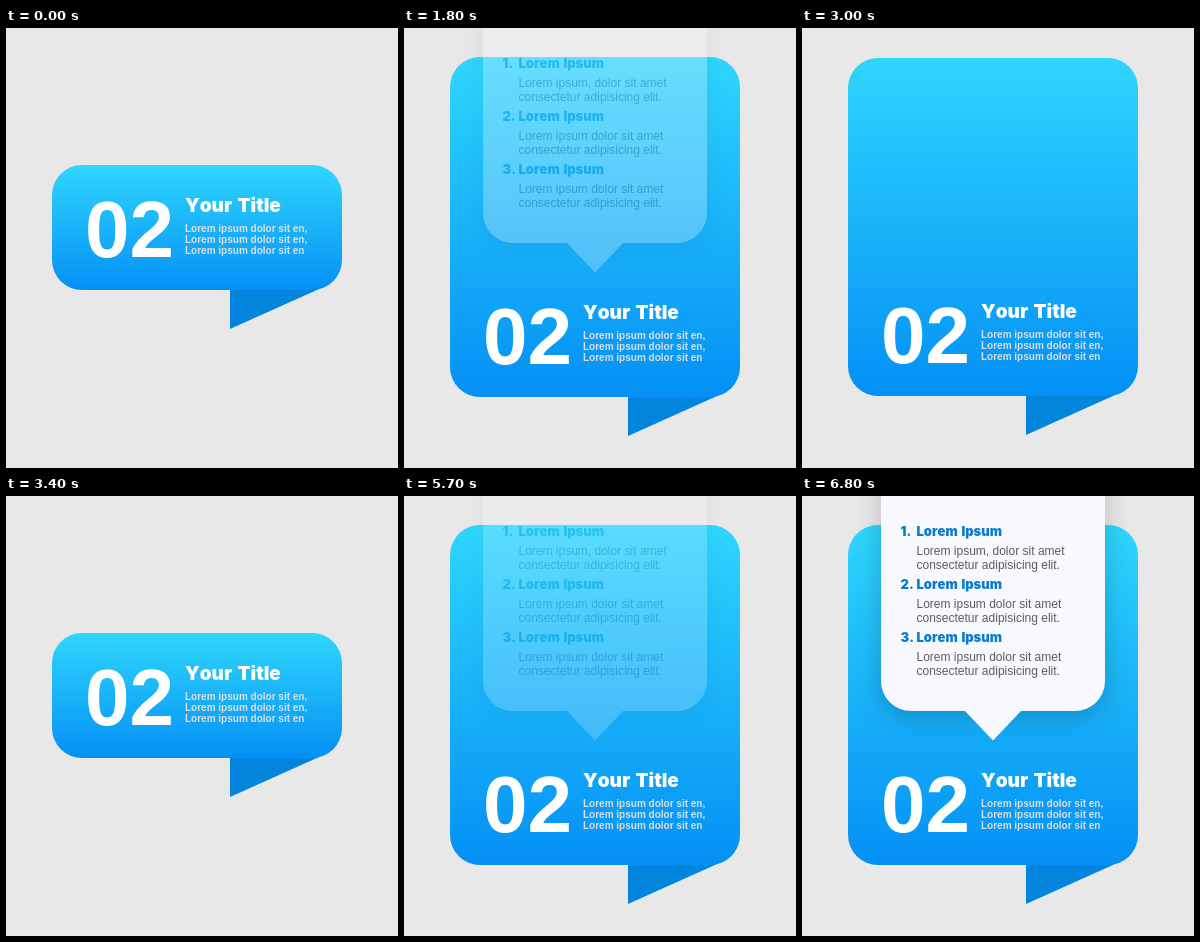
These frames come from a looping animation (392 px wide and 440 px high, 8000 ms). An HTML page:

```html
<!DOCTYPE html>
<html lang="en">
<head>
<meta charset="utf-8">
<title>Expanding card</title>
<style>
  html, body { margin: 0; width: 100%; height: 100%; overflow: hidden; background: #e8e8e8; }
  svg { display: block; width: 392px; height: 440px; }
  text { font-family: "Liberation Sans", Arial, sans-serif; }
  .black {
    font-family: Inter, "Arial Black", sans-serif; font-weight: 900;
    font-kerning: none; word-spacing: .08em;
  }
  .number { font-size: 80px; font-weight: 700; fill: #fff; }
  .title { font-size: 19px; fill: #fff; }
  .note { font-size: 10px; font-weight: 700; fill: #ddd; }
  .heading { font-size: 13px; fill: #0a7ccb; }
  .body { font-size: 12px; fill: #5c5c60; }
  .sheet { fill: #f8f8ff; }
  .shadow { filter: drop-shadow(0 6px 13px rgba(0, 0, 0, .2)); }
</style>
</head>
<body>
<svg viewBox="0 0 392 440">
  <defs>
    <linearGradient id="sky" x2="0" y2="1">
      <stop stop-color="#2fd6fd"/>
      <stop offset="1" stop-color="#0490f5"/>
    </linearGradient>
  </defs>
  <!-- y = 0 is the bottom edge of the card -->
  <g id="card">
    <path d="M224 39V-10H300L312 -.5Z" fill="#0485dd"/>
    <rect id="box" x="46" width="290" rx="30" fill="url(#sky)"/>
    <text class="number" x="79" y="-33.5">02</text>
    <text class="black title" x="179" y="-78">Your Title</text>
    <g id="notes"></g>
    <g id="panel">
      <rect class="sheet shadow" x="79" y="-500" width="224" height="346" rx="30"/>
      <path class="sheet" d="M162 -155H220L191 -124.5Z"/>
      <g id="list"></g>
    </g>
  </g>
</svg>
<script>
const LOOP = 8000, CENTER = 199, CLOSED = 125, OPEN = 340;
const GROW = 380, SHRINK = 420, FADE = 1300;
const FIRST_OPEN = 1320, CLOSE = 2972, SECOND_OPEN = 5280, GROW_DELAY = 30;

const $ = id => document.getElementById(id);

function addText(parent, className, x, y, content) {
  const node = document.createElementNS("http://www.w3.org/2000/svg", "text");
  node.setAttribute("class", className);
  node.setAttribute("x", x);
  node.setAttribute("y", y);
  node.textContent = content;
  parent.append(node);
}

["en,", "en,", "en"].forEach((end, i) =>
  addText($("notes"), "note", 179, -58 + 11 * i, "Lorem ipsum dolor sit " + end));

for (let i = 0; i < 3; i++) {
  const y = -329 + 53 * i;
  addText($("list"), "black heading", 98.5, y, `${i + 1}.`);
  addText($("list"), "black heading", 114.5, y, "Lorem Ipsum");
  addText($("list"), "body", 114.5, y + 19, `Lorem ipsum${i ? "" : ","} dolor sit amet`);
  addText($("list"), "body", 114.5, y + 33, "consectetur adipisicing elit.");
}

function ease(time, start, duration) {
  const t = Math.min(1, Math.max(0, (time - start) / duration));
  return t < .5 ? 2 * t * t : 1 - 2 * (1 - t) ** 2;
}

function draw(time) {
  const opening = time < CLOSE ? FIRST_OPEN : SECOND_OPEN;
  const closing = time >= CLOSE && time < SECOND_OPEN;
  const growth = closing
    ? 1 - ease(time, CLOSE, SHRINK)
    : ease(time, opening + GROW_DELAY, GROW);
  const halfHeight = (CLOSED + (OPEN - CLOSED) * growth) / 2;

  // Edges snap to whole pixels.
  const top = Math.round(CENTER - halfHeight);
  const bottom = Math.round(CENTER + halfHeight);
  $("card").setAttribute("transform", `translate(0 ${bottom})`);
  $("box").setAttribute("y", top - bottom);
  $("box").setAttribute("height", bottom - top);
  // The panel fades in but disappears at once.
  $("panel").setAttribute("opacity", closing ? 0 : ease(time, opening, FADE));
}

const began = performance.now();
function tick() {
  draw((performance.now() - began) % LOOP);
  requestAnimationFrame(tick);
}
tick();
</script>
</body>
</html>
```
